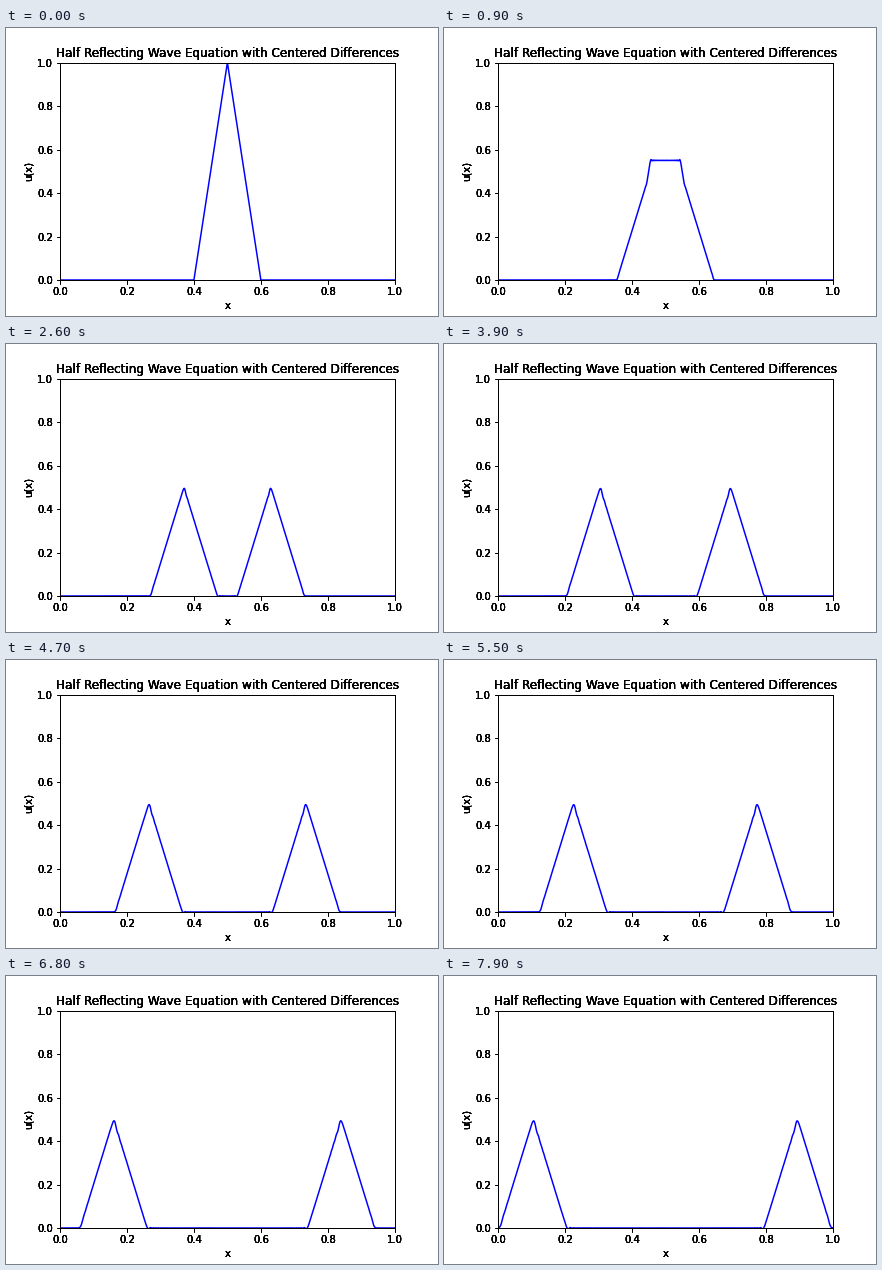
A matplotlib script for the animation above (8 s loop, 432 px wide and 288 px high).

```python
import numpy as np
import matplotlib.pyplot as plt
from matplotlib.animation import FuncAnimation

FRAMES = 80
STEPS = 10          # time steps per frame
DX = 0.001
COURANT = 0.5
INK_LAYERS = 5      # stacked frames give the heavy, hard-edged lettering


def solve(u):
    """March the wave equation with centered differences, one row per frame."""
    prev, rows = u.copy(), [u.copy()]
    for step in range(1, (FRAMES - 1) * STEPS + 1):
        new = u.copy()
        curve = u[2:] - 2 * u[1:-1] + u[:-2]
        if step == 1:  # start from rest
            new[1:-1] = u[1:-1] + 0.5 * COURANT**2 * curve
        else:
            new[1:-1] = 2 * u[1:-1] - prev[1:-1] + COURANT**2 * curve
        # open left end, fixed right end
        new[0] = u[0] + COURANT * (u[1] - u[0])
        prev, u = u, new
        if step % STEPS == 0:
            rows.append(u.copy())
    return rows


def add_frame(fig, **kw):
    ax = fig.add_axes([0.125, 0.125, 0.775, 0.755], **kw)
    ax.set(xlim=(0, 1), ylim=(0, 1), xlabel="x", ylabel="u(x)")
    ax.set_title("Half Reflecting Wave Equation with Centered Differences")
    return ax


plt.rcParams.update({"font.family": "DejaVu Sans", "font.size": 10})

x = np.linspace(0, 1, round(1 / DX) + 1)
waves = solve(np.maximum(0, 1 - 10 * np.abs(x - 0.5)))

fig = plt.figure(figsize=(6, 4), dpi=72, facecolor="white")
ax = add_frame(fig)
line, = ax.plot(x, waves[0], color="blue", lw=1.5)
for _ in range(INK_LAYERS - 1):
    add_frame(fig, frameon=True, facecolor="none")


def update(i):
    line.set_ydata(waves[i])
    return line,


anim = FuncAnimation(fig, update, frames=FRAMES, interval=100,
                     repeat=True, repeat_delay=0, blit=False)
plt.show()
```
